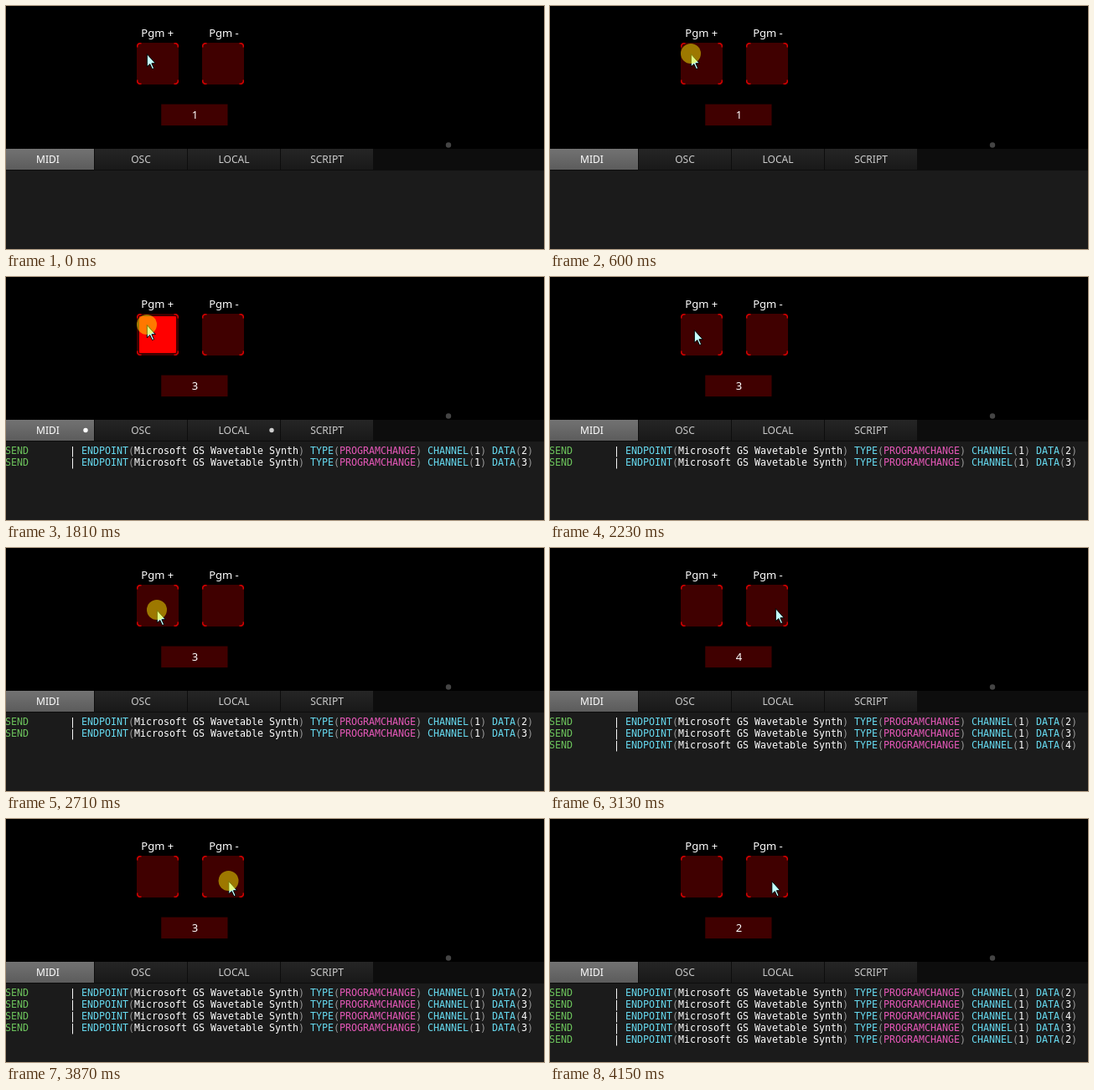
Recreate the animation shown at these times as an HTML page. Size 642 by 291 pixels, loop 4.22 s.

```html
<!DOCTYPE html>
<html lang="en">
<head>
<meta charset="utf-8">
<title>Program change</title>
<style>
html, body { margin: 0; width: 100%; height: 100%; overflow: hidden; background: #000; }
svg { display: block; width: 642px; height: 291px; }
.ui { font: 13px "Noto Sans", "Open Sans", sans-serif; fill: #fff; text-anchor: middle; }
.tab { font-size: 12px; fill: #ccc; }
.log { font: 11.63px "DejaVu Sans Mono", monospace; fill: #fff; }
.log text { white-space: pre; }
.send { fill: #6cc35c; }
.key { fill: #66d9ef; }
.par { fill: #999; }
.type { fill: #e558b8; }
</style>
</head>
<body>
<svg id="stage" viewBox="0 0 642 291">
  <defs>
    <linearGradient id="on" x2="0" y2="1"><stop stop-color="#727272"/><stop offset="1" stop-color="#5c5c5c"/></linearGradient>
    <linearGradient id="off" x2="0" y2="1"><stop stop-color="#252525"/><stop offset="1" stop-color="#191919"/></linearGradient>
    <g id="button">
      <rect width="50" height="50" rx="2" fill="#400000"/>
      <path d="M.75 5.5V3L3 .75H5.5M44.5 .75H47L49.25 3V5.5M49.25 44.5V47L47 49.25H44.5M5.5 49.25H3L.75 47V44.5" fill="none" stroke="#d40000" stroke-width="1.5"/>
    </g>
  </defs>
  <rect width="642" height="291"/>
  <use href="#button" x="156" y="44"/>
  <use href="#button" x="234" y="44"/>
  <rect id="lit" y="47" width="44" height="44" rx="1" fill="#f00"/>
  <rect x="185.25" y="117.6" width="79.25" height="25.5" fill="#400000"/>
  <g class="ui">
    <text x="180.7" y="37">Pgm +</text>
    <text x="260" y="37">Pgm -</text>
    <text id="value" x="225.5" y="135"></text>
  </g>
  <circle cx="528" cy="166.5" r="3.2" fill="#444"/>
  <rect y="171" width="642" height="26" fill="#0d0d0d"/>
  <g id="tabs" class="ui"></g>
  <circle id="midi" cx="95" cy="183.5" r="2.7" fill="#fff"/>
  <circle id="local" cx="317" cy="183.5" r="2.7" fill="#ccc"/>
  <rect y="197" width="642" height="94" fill="#1b1b1b"/>
  <g id="log" class="log"></g>
  <g id="pointer">
    <path d="M.3 .5V15.8L3.8 12.6L6.5 18.6L8.6 17.6L5.9 11.7H10.3Z" fill="#c4ffff" stroke="#000" stroke-width="1"/>
    <circle id="press" r="12" fill="#fff500" opacity=".49"/>
  </g>
</svg>
<script>
const LOOP = 4220, STEP = 70;
const PLUS = 159, MINUS = 237;
const $ = id => document.getElementById(id);

// down: mouse pressed; at: the button reacts
const clicks = [
  { down: 600, at: 670, x: PLUS, value: 2 },
  { down: 1810, at: 1810, x: PLUS, value: 3 },
  { down: 2710, at: 2780, x: PLUS, value: 4 },
  { down: 3260, at: 3260, x: MINUS, value: 3 },
  { down: 3870, at: 3940, x: MINUS, value: 2 }
];

// time, x, y
const path = [
  [0, 168, 57],
  [2090, 169, 59], [2160, 170, 61], [2230, 172, 63], [2300, 174, 66],
  [2370, 176, 69], [2440, 178, 71], [2510, 179, 73], [2580, 180, 74],
  [2920, 194, 74], [2990, 222, 73], [3060, 252, 72], [3130, 269, 72],
  [3260, 265.5, 74], [3940, 264.5, 74]
];

const span = (cls, s) => `<tspan class="${cls}">${s}</tspan>`;
const field = (key, s) => span("key", key) + span("par", "(") + s + span("par", ")");

$("tabs").innerHTML = ["MIDI", "OSC", "LOCAL", "SCRIPT"].map((name, i) => {
  const x = i * 111 - 5, active = i === 0;
  return `<rect x="${x}" y="171" width="110" height="25" fill="url(#${active ? "on" : "off"})"/>
    <text class="tab" x="${x + 55}" y="188" ${active ? 'style="fill:#fff"' : ""}>${name}</text>`;
}).join("");

$("log").innerHTML = clicks.map(({ value }, i) =>
  `<text x="-1" y="${212 + i * 14}">` + span("send", "SEND") + "       | " + [
    field("ENDPOINT", "Microsoft GS Wavetable Synth"),
    field("TYPE", span("type", "PROGRAMCHANGE")),
    field("CHANNEL", 1),
    field("DATA", value)
  ].join(" ") + "</text>").join("");
const lines = [...$("log").children];

const show = (el, on) => el.setAttribute("visibility", on ? "visible" : "hidden");

function render(t) {
  const last = clicks.filter(c => t >= c.at).pop();
  const age = last ? t - last.at : Infinity;
  const [, x, y] = path.filter(p => t >= p[0]).pop();

  $("value").textContent = last ? last.value : 1;
  if (last) $("lit").setAttribute("x", last.x);
  show($("lit"), age < STEP);
  show($("midi"), age < 2 * STEP);
  show($("local"), age < 3 * STEP);
  lines.forEach((line, i) => show(line, t >= clicks[i].at));
  show($("press"), clicks.some(c => t >= c.down && t < c.at + STEP));
  $("pointer").setAttribute("transform", `translate(${x} ${y})`);
}

const start = performance.now();
function tick() {
  render((performance.now() - start) % LOOP);
  requestAnimationFrame(tick);
}
tick();
</script>
</body>
</html>
```
